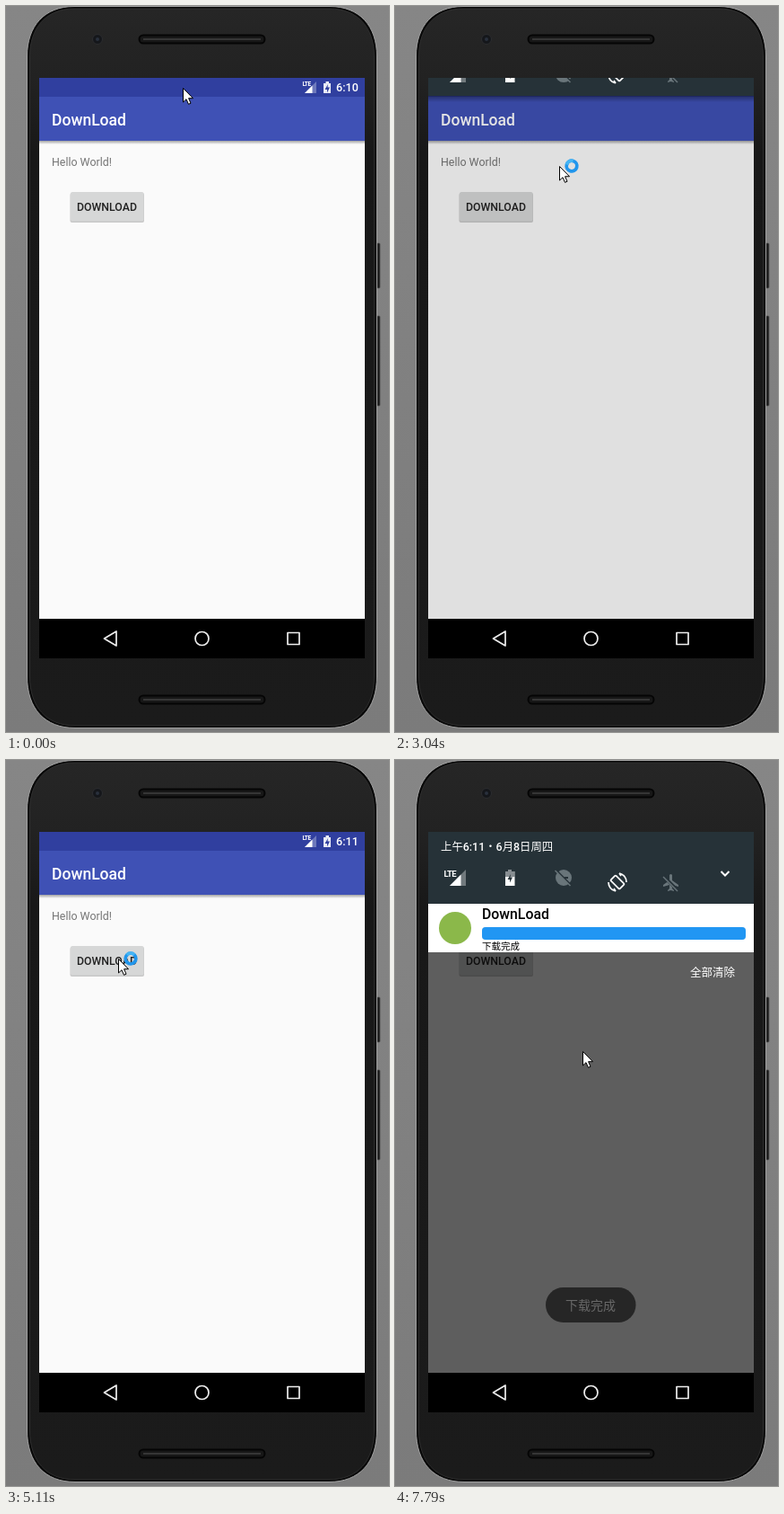
An HTML page for the animation above (8 s loop, 427 by 808 pixels).

```html
<!DOCTYPE html>
<html lang="zh-CN">
<head>
<meta charset="utf-8">
<style>
html, body { margin: 0; width: 100%; height: 100%; overflow: hidden; background: #808080; }
svg { display: block; width: 427px; height: 808px; font-family: Roboto, "Noto Sans CJK SC", "Noto Sans CJK", sans-serif; }
.medium { font-weight: 500; }
</style>
</head>
<body>
<svg viewBox="0 0 427 808">
  <defs>
    <linearGradient id="backdrop" x2="0" y2="1"><stop stop-color="#868686"/><stop offset="1" stop-color="#7b7b7b"/></linearGradient>
    <linearGradient id="shell" x2="0" y2="1">
      <stop stop-color="#262626"/><stop offset=".1" stop-color="#222"/><stop offset=".2" stop-color="#181818"/><stop offset="1" stop-color="#1b1b1b"/>
    </linearGradient>
    <linearGradient id="shade" x2="0" y2="1"><stop stop-opacity=".35"/><stop offset="1" stop-opacity="0"/></linearGradient>
    <clipPath id="screen"><path d="M37 80H400V682H37Z"/></clipPath>
    <clipPath id="noteClip"><rect id="noteMask" x="37" width="363" height="54"/></clipPath>
    <g id="speaker">
      <rect x="148.500" y=".5" width="140" height="9" rx="4.500" fill="#171717" stroke="#050505" stroke-width="2"/>
      <path d="M153 5H284" stroke="#353535" stroke-width="2"/>
    </g>
    <path id="bolt" d="M1 -4 -2.500 2H0V5.500L3 -.5H.5Z"/>
  </defs>

  <path fill="url(#backdrop)" d="M0 0H427V808H0Z"/>
  <g fill="#222" stroke="#555" stroke-width=".7">
    <rect x="412" y="264" width="5" height="50" rx="1"/>
    <rect x="412" y="345" width="5" height="100" rx="1"/>
  </g>
  <g id="body">
    <path id="case" d="M76 .5H361C394 .5 413.500 22 413.500 56V746C413.500 782 394 803.500 360 803.500H77C43 803.500 23.500 782 23.500 746V56C23.500 22 43 .5 76 .5Z" fill="#080808" stroke="#a2a2a2"/>
    <path d="M76 3H361C392 3 410.500 24 410.500 56V746C410.500 780 392 801 360 801H77C45 801 26.500 780 26.500 746V56C26.500 24 45 3 76 3Z" fill="url(#shell)" stroke="#343434" stroke-width=".8"/>
  </g>
  <use href="#speaker" y="32"/>
  <use href="#speaker" y="767"/>
  <circle cx="102" cy="37" r="5.500" fill="#15171b" stroke="#2c2d30"/>
  <circle cx="102" cy="37" r="2" fill="#29303c"/>

  <path d="M37 682H400V726H37Z"/>
  <g fill="none" stroke="#eee" stroke-width="1.700" stroke-linejoin="round">
    <path d="M123 696V712L109.500 704Z"/>
    <circle cx="218.500" cy="704" r="7.500"/>
    <rect x="314" y="697.500" width="13" height="13"/>
  </g>

  <g clip-path="url(#screen)">
    <path fill="#fafafa" d="M37 80H400V682H37Z"/>
    <path fill="#303f9f" d="M37 80H400V101H37Z"/>
    <path fill="#3f51b5" d="M37 101H400V150H37Z"/>
    <rect x="37" y="150" width="363" height="4" fill="url(#shade)"/>
    <text class="medium" x="51" y="132.500" font-size="17.500" fill="#fff">DownLoad</text>
    <text x="51" y="178" font-size="12.400" fill="#757575">Hello World!</text>
    <rect x="71.500" y="208" width="82.500" height="33" rx="2" fill="#000" opacity=".2"/>
    <rect x="72" y="207" width="81.500" height="32.500" rx="2" fill="#d6d7d7"/>
    <text class="medium" x="79" y="228" font-size="12.300" fill="#212121">DOWNLOAD</text>

    <g id="status" fill="#fff">
      <circle id="badge" cx="52.500" cy="90.500" r="6"/>
      <text x="330.500" y="89" font-size="6.500" font-weight="700" textLength="" letter-spacing="-.5">LTE</text>
      <path d="M346 84V97H333Z" opacity=".3"/>
      <path d="M341.500 88.500V97H333Z"/>
      <path d="M354 86H356.500V84H360V86H362V97H354Z" opacity=".9"/>
      <use href="#bolt" x="358" y="91" fill="#303f9f"/>
      <text id="clock" class="medium" x="368" y="95" font-size="12.600"></text>
    </g>

    <rect id="dim" x="37" y="80" width="363" height="602"/>

    <g id="panel">
      <text id="empty" x="190" y="32" font-size="14" fill="#fff">没有通知</text>
      <text id="clear" x="329" y="81" font-size="12.500" fill="#fff">全部清除</text>
      <rect x="37" width="363" height="7" fill="url(#shade)"/>
      <path fill="#263238" d="M37 -90H400V0H37Z"/>
    </g>
    <g clip-path="url(#noteClip)">
      <g id="note">
        <path fill="#fff" d="M37 0H400V54H37Z"/>
        <circle cx="67" cy="27" r="18" fill="#8bb84a"/>
        <text class="medium" x="97" y="16.500" font-size="15.800">DownLoad</text>
        <rect x="97" y="26" width="294" height="14" rx="4" fill="#e0e0e0"/>
        <rect id="bar" x="97" y="26" height="14" rx="4" fill="#2196f3"/>
        <text id="done" class="medium" x="97" y="51" font-size="10.500">下载完成</text>
      </g>
    </g>
    <text id="date" class="medium" x="51" font-size="12.400" fill="#fff"></text>
    <g class="tile" fill="#fff">
      <text x="54.500" y="-1" font-size="9.500" font-weight="700" letter-spacing="-.7">LTE</text>
      <path d="M79 -9V9H61Z" opacity=".35"/>
      <path d="M73.500 -3.500V9H61Z"/>
      <path d="M123 -7H126V-9H130V-7H133.500V9H123Z"/>
      <path d="M123 -7H126V-9H130V-7H133.500V-1H123Z" fill="#263238" opacity=".55"/>
      <use href="#bolt" x="128" fill="#263238"/>
      <circle cx="188" r="9" fill="#69757a"/>
      <path d="M179 -9 197 9M189 0H193" stroke="#263238" stroke-width="2"/>
      <path d="M178.500 -8 195.500 9" stroke="#69757a" stroke-width="1.500"/>
    </g>
    <g class="tile" fill="none" stroke="#fff" stroke-width="1.700">
      <rect x="-4" y="-7" width="8" height="14" rx="1" transform="translate(248) rotate(-45)"/>
      <path d="M250 -10A10 10 0 0 1 258 0M246 10A10 10 0 0 1 238 0M250 -10 252 -7M246 10 244 7"/>
    </g>
    <g class="tile" fill="#69757a">
      <path d="M306 -9Q307.500 -11 309 -9V-3L316 2V4L309 2V6L311 8V9L307.500 8 304 9V8L306 6V2L299 4V2L306 -3Z"/>
      <path d="M299 -8 315 8" stroke="#263238" stroke-width="3.500"/>
      <path d="M299 -7 315 9" stroke="#69757a" stroke-width="1.500"/>
    </g>
    <path class="tile" d="M363.500 -2 368 2.500 372.500 -2" fill="none" stroke="#fff" stroke-width="2"/>

    <g id="toast">
      <rect x="168" y="587" width="100.500" height="39" rx="19.500" fill="#262626"/>
      <text x="190" y="612" font-size="14" fill="#686868">下载完成</text>
    </g>
  </g>

  <g id="pointer">
    <path d="M.5 .5V16L4 12.700 6.500 18.300 9 17.200 6.600 11.700H11.500Z" fill="#fff" stroke="#000"/>
    <g id="ring" fill="none" stroke-width="3.800">
      <circle r="5.800" stroke="#2196ec"/>
      <path d="M-5.800 0A5.800 5.800 0 0 1 0 -5.800" stroke="#45b4f4"/>
    </g>
  </g>
</svg>
<script>
const LOOP = 8000;
const $ = id => document.getElementById(id);
const tiles = document.querySelectorAll('.tile');
const clamp = (v, lo = 0, hi = 1) => Math.min(hi, Math.max(lo, v));
const fade = (id, v) => $(id).setAttribute('opacity', v);
const move = (el, x, y) => el.setAttribute('transform', `translate(${x} ${y})`);

const steps = [[0, 0, 1], [120, 1110, 8], [1230, 1230, 1], [1540, 2470, 8], [2620, 3610, 8],
  [3760, 4720, 8], [4990, 5920, 8], [6070, 7010, 8], [7130, 7790, 6]]
  .flatMap(([a, b, n]) => Array.from({length: n}, (_, i) => a + (b - a) * i / Math.max(1, n - 1)));

// Keys: [time, ...values]
const pointerKeys = [[0, 197, 91], [120, 196, 77], [400, 180, 160], [700, 174, 280], [1110, 188, 436],
  [1230, 206, 441], [1540, 206, 441], [2000, 181, 260], [2470, 203, 93], [2620, 200, 86],
  [3044, 183, 178], [3610, 195, 300], [3760, 204, 270], [3897, 208, 161], [4171, 177, 191],
  [4720, 140, 205], [4990, 125, 220], [5256, 125, 222], [5654, 185, 150], [5920, 226, 95],
  [6070, 221, 114], [6339, 212, 150], [7010, 206, 305], [7790, 209, 324]];
const panelKeys = [[2620, 80], [2760, 91], [3044, 100], [3327, 130], [3610, 152], [3760, 154],
  [3897, 144], [4171, 91], [4308, 80], [6204, 80], [6473, 102], [6876, 160]];

function at(keys, t) {
  const i = keys.findIndex(k => k[0] > t);
  if (i < 0) return keys.at(-1).slice(1);
  if (i === 0) return keys[0].slice(1);
  const a = keys[i - 1], b = keys[i], p = (t - a[0]) / (b[0] - a[0]);
  return a.slice(1).map((v, j) => v + (b[j + 1] - v) * p);
}

function draw(now) {
  const t = steps.findLast(s => s <= now % LOOP + 25);
  const [x, y] = at(pointerKeys, t);
  const [edge] = at(panelKeys, t);
  const open = clamp((edge - 91) / 53);
  const stretch = clamp((edge - 144) / 16);
  const started = t > 5380, finished = t > 7500;
  const time = t > 4200 ? '6:11' : '6:10';

  move($('pointer'), x, y);
  move($('ring'), 14, 0);
  $('ring').setAttribute('transform', `translate(14) rotate(${t * .36 % 360})`);
  fade('ring', t > 2400 && t < 7100 ? 1 : 0);

  fade('status', edge > 80 ? 0 : 1);
  fade('badge', started ? 1 : 0);
  $('clock').textContent = time;
  $('date').textContent = `上午${time}・6月8日周四`;

  fade('dim', open * .624);
  move($('panel'), 0, edge);
  fade('panel', edge > 80 ? 1 : 0);
  fade('empty', started ? 0 : clamp(open * 1.25 - .25));
  fade('clear', started ? clamp(open * 1.25 - .25) : 0);

  // Tiles ride on the panel edge, then lag behind it by different amounts
  const row = Math.min(edge, 144) - 24;
  [11, 16, 17, 6].forEach((lag, i) => move(tiles[i], 0, row + lag * stretch));
  $('date').setAttribute('y', row - 26.500 + 7 * stretch);

  move($('note'), 0, edge);
  $('noteMask').setAttribute('y', edge);
  $('noteMask').setAttribute('height', started ? 54 * open : 0);
  $('bar').setAttribute('width', 294 * clamp((t - 5389) / 2130));
  fade('done', finished ? 1 : 0);
  fade('toast', clamp((t - 7526) / 264));
}

const start = performance.now();
function tick() {
  draw(performance.now() - start);
  requestAnimationFrame(tick);
}
tick();
</script>
</body>
</html>
```
